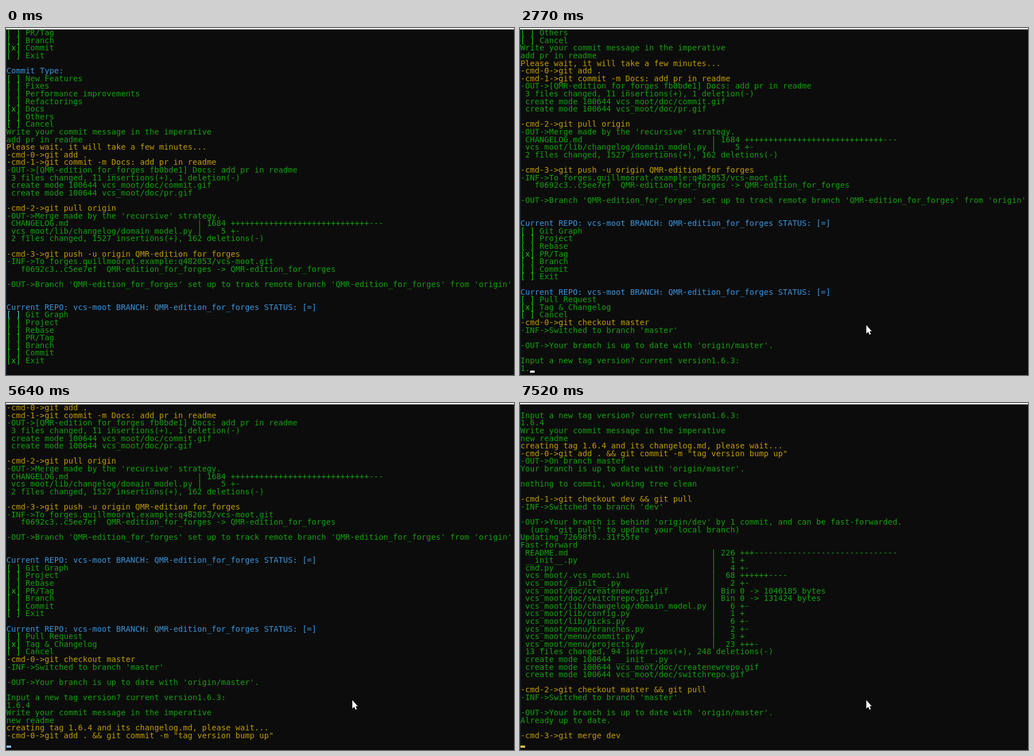
Write an HTML page with a canvas that moves like this. It is 905 px wide and 619 px high and loops after 8 s.

```html
<!DOCTYPE html>
<html lang="en">
<head>
<meta charset="utf-8">
<title>Terminal session</title>
<style>
  html, body { margin: 0; width: 100%; height: 100%; overflow: hidden; background: #0c0c0c; }
  canvas { display: block; }
</style>
</head>
<body>
<canvas id="screen" width="905" height="619"></canvas>
<script>
const LOOP = 8000, ROWS = 45, CELL = 8.5, LINE = 13.6, LEFT = 0.7, BASELINE = 13.2;
const GREEN = '#13a10e', BRIGHT = '#16c60c', YELLOW = '#c19c00', BLUE = '#3a96dd', CYAN = '#61d6d6';
const WHITE = '#f2f2f2', PALE = '#8cc0e8', GOLD = '#dcc04a';

const repo = 'vcs-moot', dir = 'vcs_moot', branch = 'QMR-edition_for_forges';
const header = `Current REPO: ${repo} BRANCH: ${branch} STATUS: [=]`;
const prompt = 'Write your commit message in the imperative';
const upToDate = "our branch is up to date with 'origin/master'.";

const menu = (options, chosen) => options.map(o => `[${o === chosen ? 'x' : ' '}] ${o}`);
const stat = (file, change) => ` ${file}`.padEnd(40) + '| ' + change;
const created = file => ` create mode 100644 ${file}`;

// Output blocks, each appended to the log as the session goes on
const blocks = [
  t => [
    ...menu(['PR/Tag', 'Branch', 'Commit', 'Exit'], 'Commit'),
    '',
    'Commit Type:',
    ...menu(['New Features', 'Fixes', 'Performance improvements', 'Refactorings', 'Docs', 'Others', 'Cancel'], 'Docs'),
    prompt,
    'add pr in readme',
    'Please wait, it will take a few minutes...',
    '-cmd-0->git add .',
    '-cmd-1->git commit -m Docs: add pr in readme',
    `-OUT->[${branch} fb0bde1] Docs: add pr in readme`,
    ' 3 files changed, 11 insertions(+), 1 deletion(-)',
    created(`${dir}/doc/commit.gif`),
    created(`${dir}/doc/pr.gif`),
    '',
    '-cmd-2->git pull origin',
    "-OUT->Merge made by the 'recursive' strategy.",
    stat('CHANGELOG.md', '1684 ' + '+'.repeat(29) + '---'),
    stat(`${dir}/lib/changelog/domain_model.py`, '   5 +-'),
    ' 2 files changed, 1527 insertions(+), 162 deletions(-)',
    '',
    `-cmd-3->git push -u origin ${branch}`,
    `-INF->To forges.quillmoorat.example:q482053/${repo}.git`,
    `   f0692c3..c5ee7ef  ${branch} -> ${branch}`,
    '',
    `-OUT->Branch '${branch}' set up to track remote branch '${branch}' from 'origin'`,
    '',
    '',
    header,
    ...menu(['Git Graph', 'Project', 'Rebase', 'PR/Tag', 'Branch', 'Commit', 'Exit'],
      t < 70 ? 'Exit' : t < 300 ? 'Commit' : 'PR/Tag'),
  ],
  t => ['', header,
    ...menu(['Pull Request', 'Tag & Changelog', 'Cancel'], t < 1390 ? 'Cancel' : 'Tag & Changelog')],
  () => ['-cmd-0->git checkout master', "-INF->Switched to branch 'master'", '',
    '-OUT->Y' + upToDate, '', 'Input a new tag version? current version1.6.3:'],
  () => ['1.6.4', prompt],
  () => ['new readme', 'creating tag 1.6.4 and its changelog.md, please wait...'],
  () => ['-cmd-0->git add . && git commit -m "tag version bump up"'],
  () => ['-OUT->On branch master', 'Y' + upToDate, '',
    'nothing to commit, working tree clean', '', '-cmd-1->git checkout dev && git pull'],
  () => [
    "-INF->Switched to branch 'dev'",
    '',
    "-OUT->Your branch is behind 'origin/dev' by 1 commit, and can be fast-forwarded.",
    '  (use "git pull" to update your local branch)',
    'Updating 72698f9..31f55fe',
    'Fast-forward',
    stat('README.md', '226 +++' + '-'.repeat(30)),
    stat('__init__.py', '  1 +'),
    stat('cmd.py', '  4 +-'),
    stat(`${dir}/.${dir}.ini`, ' 68 ++++++----'),
    stat(`${dir}/__init__.py`, '  2 +-'),
    stat(`${dir}/doc/createnewrepo.gif`, 'Bin 0 -> 1046185 bytes'),
    stat(`${dir}/doc/switchrepo.gif`, 'Bin 0 -> 131424 bytes'),
    stat(`${dir}/lib/changelog/domain_model.py`, '  6 +-'),
    stat(`${dir}/lib/config.py`, '  1 +'),
    stat(`${dir}/lib/picks.py`, '  6 +-'),
    stat(`${dir}/menu/branches.py`, '  2 +-'),
    stat(`${dir}/menu/commit.py`, '  3 +'),
    stat(`${dir}/menu/projects.py`, ' 23 +++-'),
    ' 13 files changed, 94 insertions(+), 248 deletions(-)',
    created('__init__.py'),
    created(`${dir}/doc/createnewrepo.gif`),
    created(`${dir}/doc/switchrepo.gif`),
    '',
    '-cmd-2->git checkout master && git pull',
  ],
  () => ["-INF->Switched to branch 'master'", '', '-OUT->Y' + upToDate,
    'Already up to date.', '', '-cmd-3->git merge dev'],
];

// [start ms, last block shown, typed text, caret colour]
const steps = [
  [0, 0, ''], [610, 0, '', WHITE],
  [760, 1, '', WHITE], [840, 1, ''],
  [1460, 2, '', WHITE], [1690, 2, ''],
  [2070, 2, '1.', WHITE], [2220, 2, '1.'], [2770, 2, '1.', WHITE],
  [3090, 2, '1.6', WHITE], [3320, 2, '1.6'],
  [3780, 2, '1.6.'], [3860, 2, '1.6.', WHITE], [4160, 2, '1.6.4', WHITE],
  [4390, 3, 'ne', PALE], [4470, 3, 'new ', PALE],
  [4700, 3, 'new r', PALE], [4780, 3, 'new re', PALE],
  [5010, 3, 'new readm', PALE], [5330, 3, 'new readme', PALE],
  [5560, 4, '', PALE], [5640, 5, '', PALE],
  [6120, 6, '', PALE], [6750, 6, ''], [6820, 6, '', PALE],
  [7220, 7, '', PALE], [7370, 7, ''],
  [7520, 8, '', GOLD],
];

const ctx = document.getElementById('screen').getContext('2d');
const pointer = new Path2D('M617 530V545L620.4 541.9L622.6 547L625 546L622.8 541H626.6Z');

function lineColor(line) {
  if (/^(-cmd|Please|creating)/.test(line)) return YELLOW;
  return /^(Current|Commit Type)/.test(line) ? BLUE : GREEN;
}

function prefixColor(line, t) {
  const fresh = (t < 70 && line.endsWith('Git Graph')) || (t < 1390 && line.endsWith('Pull Request'));
  return fresh ? CYAN : BRIGHT;
}

function drawLine(line, row, t) {
  const color = lineColor(line), isOption = line[0] === '[';
  const y = Math.round(BASELINE + row * LINE);
  [...line].forEach((char, col) => {
    if (char === ' ') return;
    ctx.fillStyle = isOption && col < 3 ? prefixColor(line, t) : color;
    ctx.fillText(char, LEFT + col * CELL, y);
  });
}

function draw(t) {
  const [, last, typed, caret] = steps.findLast(step => step[0] <= t);
  const log = blocks.slice(0, last + 1).flatMap(block => block(t));

  ctx.fillStyle = '#0c0c0c';
  ctx.fillRect(0, 0, 905, 619);
  ctx.fillStyle = '#14283a';
  ctx.fillRect(0, 2, 1, 617);
  ctx.fillStyle = '#f4f4f4';
  ctx.fillRect(0, 0, 905, 2.5);

  ctx.font = '14px "DejaVu Sans Mono", monospace';
  [...log, typed].slice(-ROWS).forEach((line, row) => drawLine(line, row, t));
  if (caret) {
    ctx.fillStyle = caret;
    ctx.fillRect(Math.round(LEFT + typed.length * CELL), 611, 8, 4);
  }
  if (t >= 70) {
    ctx.fillStyle = '#fff';
    ctx.fill(pointer);
  }
}

const start = performance.now();
function tick() {
  draw((performance.now() - start) % LOOP);
  requestAnimationFrame(tick);
}
tick();
</script>
</body>
</html>
```
